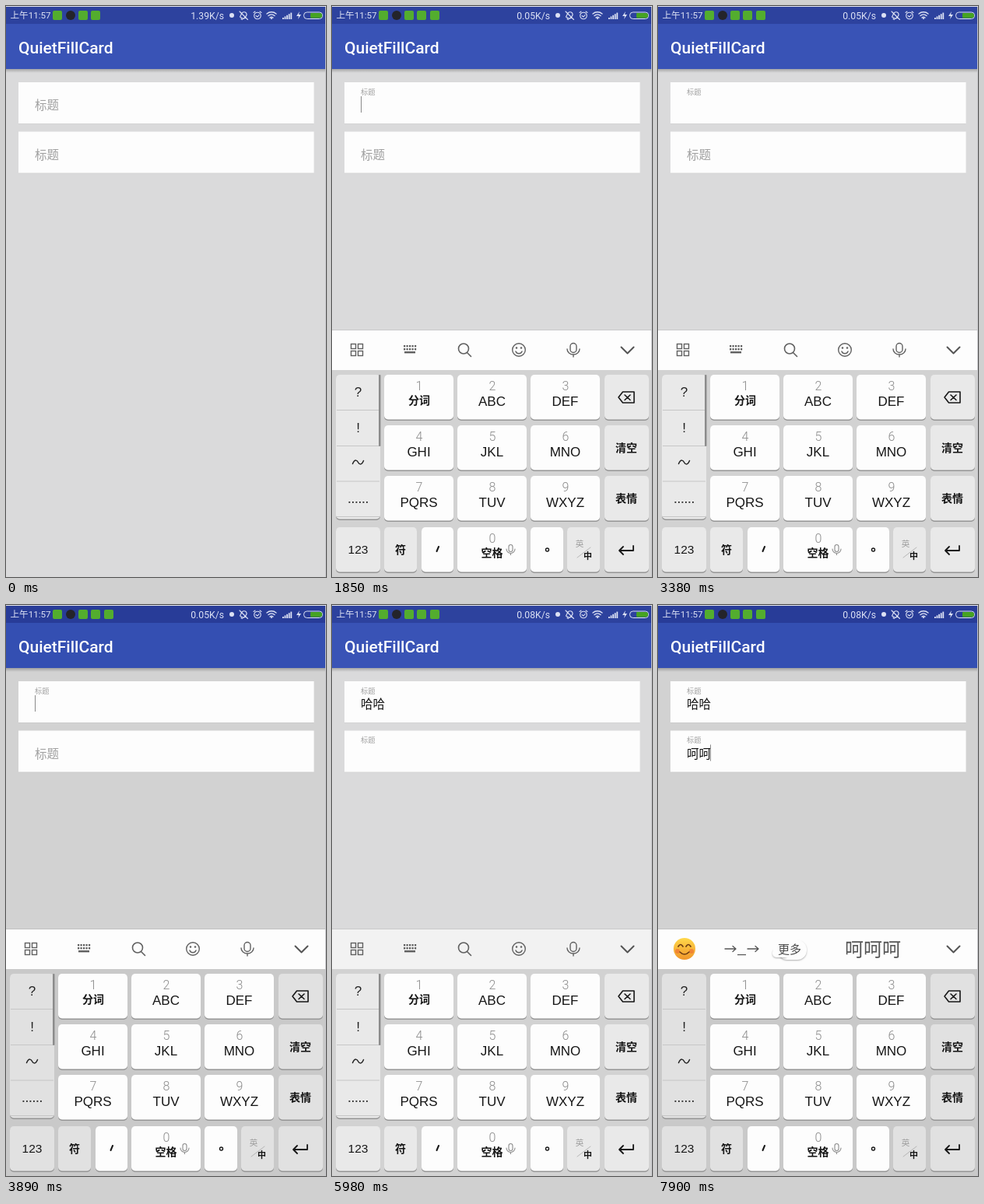
An HTML page with a canvas that plays this animation: 411 px wide and 734 px high, repeating every 8000 ms.

```html
<!DOCTYPE html>
<html lang="zh-CN">
<head>
<meta charset="utf-8">
<title>Floating labels</title>
<style>
html, body { margin: 0; width: 100%; height: 100%; overflow: hidden; }
canvas { display: block; width: 411px; height: 734px; }
</style>
</head>
<body>
<canvas id="stage"></canvas>
<script>
const W = 411, H = 734, LOOP = 8000;
const canvas = document.getElementById('stage');
const g = canvas.getContext('2d');
const dpr = window.devicePixelRatio || 1;
canvas.width = W * dpr;
canvas.height = H * dpr;

const CJK = '"Noto Sans CJK SC", "Noto Sans CJK", sans-serif';
const ROBOTO = 'Roboto, "Noto Sans CJK SC", "Noto Sans CJK", sans-serif';
const SANS = '"Liberation Sans", "Noto Sans CJK SC", sans-serif';

// Timeline in ms
const FOCUS_A = [780, 1980, 2930];
const FOCUS_B = [1980, 2930, 5280];
const CARET_A = [[900, 1320], [1850, 1980], [2930, 3370], [3890, 4995]];
const CARET_B = [[1980, 2500], [5400, 5975], [6480, 6980], [7510, LOOP]];
const LIGHT = [[0, 780], [1850, 3890], [5975, 7080]];
const GREY_BAR = [[780, 1850], [5280, 7510]];
const SCROLLBAR = [[780, 4010], [5280, 7510]];
const POINTER = [[2500, 2650]];
const WORD_A = 4540, WORD_B = 7890;

const within = (t, spans) => spans.some(([a, b]) => t >= a && t < b);
const clamp = v => Math.max(0, Math.min(1, v));
const easeOut = (t, start, dur) => 1 - (1 - clamp((t - start) / dur)) ** 2;

// Each entry toggles the label up, then down, then up again.
function lift(t, toggles) {
  return toggles.reduce((v, start, i) => {
    const p = easeOut(t, start, 250);
    return i % 2 ? v * (1 - p) : v + (1 - v) * p;
  }, 0);
}

function rect(x, y, w, h, fill) {
  g.fillStyle = fill;
  g.fillRect(x, y, w, h);
}

function round(x, y, w, h, r, fill) {
  g.fillStyle = fill;
  g.beginPath();
  g.roundRect(x, y, w, h, r);
  g.fill();
}

function dot(x, y, r, fill) {
  g.fillStyle = fill;
  g.beginPath();
  g.arc(x, y, r, 0, 7);
  g.fill();
}

// y is the visual middle of the glyphs.
function text(str, x, y, size, color, font = CJK, weight = 400, align = 'left') {
  g.font = `${weight} ${size}px ${font}`;
  g.fillStyle = color;
  g.textAlign = align;
  g.fillText(str, x, y + size * 0.37);
}

const label = (str, x, y, size, color, font, weight) =>
  text(str, x, y, size, color, font, weight, 'center');

function icon(x, y, d, color, width = 1.6, filled = false) {
  g.save();
  g.translate(x, y);
  const path = new Path2D(d);
  if (filled) {
    g.fillStyle = color;
    g.fill(path);
  } else {
    g.strokeStyle = color;
    g.lineWidth = width;
    g.lineJoin = g.lineCap = 'round';
    g.stroke(path);
  }
  g.restore();
}

function statusBar(t, light) {
  const ink = '#dce1f4';
  rect(0, 0, W, 23, light ? '#2d429e' : '#283c98');
  text('上午11:57', 5.5, 12, 11.6, ink, ROBOTO);
  const tiles = t < 780 ? [60, 93, 109] : [60, 93, 109, 126];
  tiles.forEach(x => round(x, 6, 12, 12, 2, '#53ad2e'));
  dot(83, 12, 6, '#24242a');

  const speed = t < 780 ? '1.39K/s' : t < 4010 ? '0.05K/s' : '0.08K/s';
  text(speed, 280, 12, 12.2, ink, ROBOTO, 400, 'right');
  dot(290, 12, 3, ink);
  icon(305, 12, 'M-4.5 2L-2-3Q1-5.5 3.5-3Q5-1 3 1.5L0 4.5zM-3 4.5l1.5 1M-5-5L5.5 5.5', ink, 1.1);
  icon(323, 12.5, 'M-4.3 0a4.3 4.3 0 1 0 8.6 0a4.3 4.3 0 1 0-8.6 0M-2 0L0 1.5L2-1M-5-4l2-1.5M5-4l-2-1.5', ink, 1.1);
  icon(341, 12, 'M-6-2a9 9 0 0 1 12 0M-4 .5a6 6 0 0 1 8 0M-2 3a3 3 0 0 1 4 0', ink, 1.4);
  dot(341, 16, 1.1, ink);
  for (let i = 0; i < 5; i++) rect(355 + i * 2.6, 15 - i * 1.6, 1.8, 2 + i * 1.6, ink);
  icon(376, 12, 'M1-5L-3 1H0L-1 5L3-1H0z', ink, 1, true);
  g.strokeStyle = ink;
  g.lineWidth = 1;
  g.beginPath();
  g.roundRect(382.5, 8, 24, 8.5, 4);
  g.stroke();
  round(391, 9, 15, 6.5, [1, 3, 3, 1], '#46a322');
}

function field(y, up, word, caret) {
  rect(16, y + 53, 379, 1, 'rgba(0,0,0,.03)');
  rect(16, y, 379.5, 53, '#fdfdfd');
  const size = 15.5 - 6.2 * up;
  text('标题', 37, y + 29.5 - 17 * up, size, '#a0a0a0');
  if (word) text(word, 37, y + 29.5, 15.5, '#111');
  if (caret) rect(word ? 67 : 37, y + 18, 1, 21, '#8a8a8a');
}

function page(t, light) {
  rect(0, 0, W, H, light ? '#dadadb' : '#d2d2d2');
  rect(0, 23, W, 58, light ? '#3953b6' : '#344fb2');
  const shade = g.createLinearGradient(0, 81, 0, 86);
  shade.addColorStop(0, 'rgba(0,0,0,.24)');
  shade.addColorStop(1, 'rgba(0,0,0,0)');
  rect(0, 81, W, 5, shade);
  statusBar(t, light);
  text('QuietFillCard', 16, 53, 21, '#fff', ROBOTO, 500);
  field(98, lift(t, FOCUS_A), t >= WORD_A ? '哈哈' : '', within(t, CARET_A));
  field(161.5, lift(t, FOCUS_B), t >= WORD_B ? '呵呵' : '', within(t, CARET_B));
}

function toolIcons() {
  const c = '#606060';
  for (const x of [24.5, 33.5]) for (const y of [434.5, 443.5]) {
    g.strokeStyle = c;
    g.lineWidth = 1.4;
    g.strokeRect(x, y, 6, 6);
  }
  for (let r = 0; r < 2; r++)
    for (let i = 0; i < 5; i++) rect(92 + i * 3.5, 436 + r * 4, 2.2, 2.4, c);
  rect(93, 444, 14, 2.4, c);
  icon(170, 442, 'M-7.5-1.5a6.5 6.5 0 1 0 13 0a6.5 6.5 0 1 0-13 0M3.5 3.5L8.5 8.5', c);
  icon(240, 442, 'M-8.3 0a8.3 8.3 0 1 0 16.6 0a8.3 8.3 0 1 0-16.6 0M-4 2a4.3 4.3 0 0 0 8 0', c, 1.4);
  dot(237, 439.5, 1.2, c);
  dot(243, 439.5, 1.2, c);
  icon(310, 442, 'M-4-4.5a4 4 0 0 1 8 0v4a4 4 0 0 1-8 0zM-8-1a8 7 0 0 0 16 0M0 6v3', c, 1.4);
}

function emoji(blush) {
  const x = 34, y = 442;
  const skin = g.createLinearGradient(0, y - 14, 0, y + 14);
  skin.addColorStop(0, '#ffd84a');
  skin.addColorStop(1, '#f0962a');
  dot(x, y, 14, skin);
  const c = '#6b3a12';
  icon(x, y - 2, 'M-8-1q3-5 6 0M2-1q3-5 6 0', c, 1.7);
  if (blush) {
    dot(x - 9, y + 3, 3, 'rgba(235,90,50,.5)');
    dot(x + 9, y + 3, 3, 'rgba(235,90,50,.5)');
    icon(x, y + 3, 'M-6 1q6 6 12 0', c, 1.6);
  } else {
    icon(x, y + 1, 'M-9 0H9Q8 10 0 10T-9 0z', c, 1, true);
    icon(x, y + 1, 'M-7.5 1H7.5L6.5 4H-6.5z', '#fff', 1, true);
  }
}

function moreButton(x) {
  g.save();
  g.shadowColor = 'rgba(0,0,0,.3)';
  g.shadowBlur = 2;
  g.shadowOffsetY = 1;
  round(x + 7, 431, 37, 25, 12, '#fdfdfd');
  round(x, 442, 20, 11, 5, '#fdfdfd');
  g.restore();
  round(x + 1, 430, 41, 23, 11, '#fdfdfd');
  text('更多', x + 7, 442, 15, '#4a4a4a');
}

function suggestions(t) {
  const c = '#555';
  emoji(t >= WORD_B);
  if (t >= WORD_B) {
    for (const x of [85, 114]) icon(x, 442, 'M1 0H15M11-3.5L15 0L11 3.5', c, 1.3);
    rect(102, 449, 11, 1.2, c);
    moreButton(147);
    text('呵呵呵', 240, 442, 24, c);
  } else {
    text('(', 85, 442, 17.5, c, SANS);
    for (const x of [98, 125])
      icon(x, 443, 'M-6-5H1L5-7M-1-5Q-6-3-6 1Q-5 5-2 4Q0 3 0 0Q0 5 4 4Q7 1 4-2Q1-4-2-1', c, 1.3);
    label('ω', 111.5, 442, 17.5, c, SANS);
    text(')hiahiahia', 131, 442, 17.5, c, SANS);
    moreButton(229);
  }
}

function key(x, y, w, fill, h = 58) {
  round(x, y + 1, w, h, 5, '#959595');
  round(x, y, w, h - 0.5, 5, fill);
}

function sideColumn(fill, bar) {
  key(5, 474, 57, fill, 186);
  for (const y of [519, 565, 610.5, 656]) rect(6, y, 55, 1, '#c6c6c6');
  label('?', 33.5, 496, 17, '#222', SANS);
  label('!', 33.5, 542, 17, '#222', SANS);
  icon(33.5, 586.5, 'M-7 2C-4-5-1-2 0 0S4 5 7-2', '#222', 1.5);
  for (let i = 0; i < 6; i++) rect(21.5 + i * 4.5, 637, 1.8, 1.8, '#222');
  if (bar) round(60, 474, 2.5, 92, 1, '#8c8c8c');
}

function keyboard(t, light) {
  const ink = '#161616', faint = '#8b8b8b', white = '#fdfdfd';
  const grey = light ? '#e9e9e9' : '#e1e1e1';
  rect(0, 416, W, 1, 'rgba(0,0,0,.08)');
  rect(0, 417, W, 330, light ? '#d2d2d2' : '#c9c9c9');
  rect(0, 417, W, 51, within(t, GREY_BAR) ? '#f2f2f2' : '#fdfdfd');

  const suggesting = (t >= WORD_A && t < 5280) || t >= WORD_B;
  if (suggesting) suggestions(t); else toolIcons();
  icon(379.5, 442.5, 'M-8-4L0 4L8-4', '#555', 2);

  sideColumn(grey, within(t, SCROLLBAR));
  const names = ['分词', 'ABC', 'DEF', 'GHI', 'JKL', 'MNO', 'PQRS', 'TUV', 'WXYZ'];
  names.forEach((name, i) => {
    const x = 67 + (i % 3) * 94, y = 474 + Math.floor(i / 3) * 65;
    key(x, y, 89, white);
    label(i + 1, x + 45, y + 14, 16, faint, ROBOTO, 300);
    if (i) label(name, x + 44.5, y + 33.3, 17, ink, SANS);
    else label(name, x + 45, y + 33.3, 14, ink, CJK, 700);
  });

  for (const y of [474, 539, 604]) key(350, y, 57, grey);
  icon(378, 503, 'M-10 0L-4.5-7H10V7H-4.5zM-2-3L5 3.5M5-3L-2 3.5', ink, 1.6);
  label('清空', 378, 568, 14, ink, CJK, 700);
  label('表情', 378, 633, 14, ink, CJK, 700);

  const row = 670;
  key(5, row, 57, grey);
  label('123', 33.5, 698.5, 15.5, ink, SANS);
  key(67, row, 42, grey);
  label('符', 88, 699, 14, ink, CJK, 700);
  key(115, row, 41, white);
  icon(135.5, 698, 'M1.5-3L-1 3', ink, 2);
  key(161, row, 89, white);
  label('0', 206, 684, 16, faint, ROBOTO, 300);
  label('空格', 205.5, 703, 14, ink, CJK, 700);
  icon(229.5, 699, 'M-2.5-4a2.5 2.5 0 0 1 5 0v4a2.5 2.5 0 0 1-5 0zM-5.5-1a5.5 5.5 0 0 0 11 0M0 4.5v2', faint, 1.1);
  key(255, row, 42, white);
  icon(276.5, 699, 'M-2 0a2 2 0 1 0 4 0a2 2 0 1 0-4 0', ink, 1.4);
  key(302, row, 42, grey);
  label('英', 318, 691, 10.5, '#999');
  icon(323, 703, 'M-8 6L9-7', '#aaa', 0.8);
  label('中', 328.5, 706.5, 11, ink, CJK, 700);
  key(350, row, 57, grey);
  icon(378, 699, 'M9-5V1H-8M-4-4L-9 1L-4 6', ink, 1.8);
}

function pointer() {
  const arrow = 'M0 0V16L3.8 12.5L6.5 19L9.5 17.7L6.8 11.5H12z';
  icon(84.5, 691.5, arrow, '#fff', 1, true);
  icon(84.5, 691.5, arrow, '#222', 1);
}

function draw(t) {
  const light = within(t, LIGHT);
  g.setTransform(dpr, 0, 0, dpr, 0, 0);
  page(t, light);
  if (t >= 780) {
    const slide = 317 * (1 - clamp((t - 780) / 420)) ** 3.35;
    g.save();
    g.translate(0, Math.round(slide));
    keyboard(t, light);
    g.restore();
  }
  if (within(t, POINTER)) pointer();
  rect(410, 0, 1, H, '#c4c4c8');
  rect(0, 0, W, 1, '#e6e6ea');
}

const begin = performance.now();
function tick() {
  draw((performance.now() - begin) % LOOP);
  requestAnimationFrame(tick);
}
tick();
</script>
</body>
</html>
```
